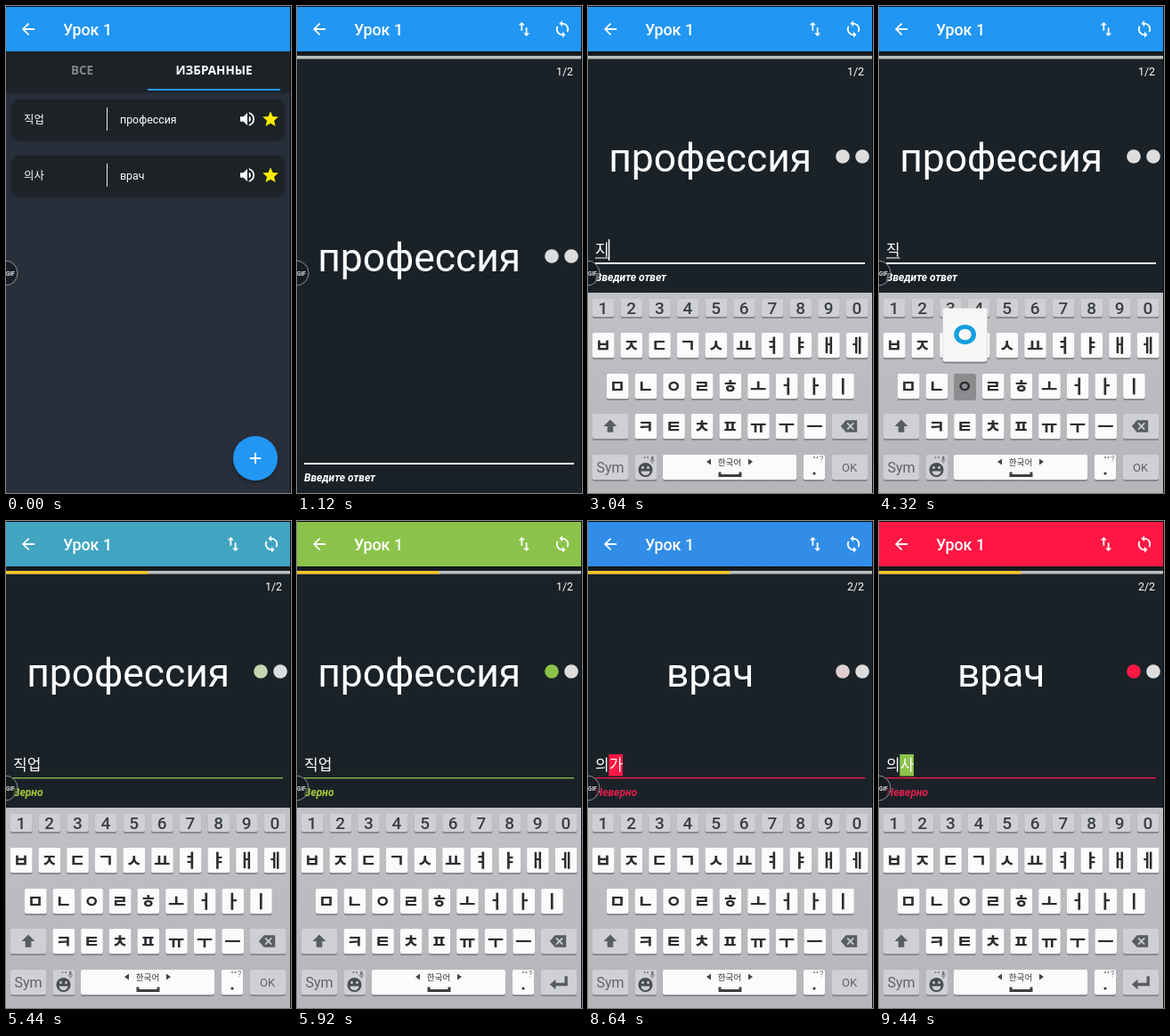
An HTML page for the animation above (9.76 s loop, 320 px wide and 547 px high).

```html
<!DOCTYPE html>
<html lang="ru">
<head>
<meta charset="utf-8">
<title>Урок 1</title>
<style>
html, body { margin: 0; width: 100%; height: 100%; overflow: hidden; background: #000; }
svg { display: block; width: 100vw; height: 100vh; }
text { font-family: Roboto, sans-serif; fill: #fff; white-space: pre; }
.ko { font-family: "Noto Sans CJK KR", "Noto Sans CJK JP", "Noto Sans CJK", sans-serif; }
.mid { text-anchor: middle; }
.end { text-anchor: end; }
.title { font-size: 17.8px; font-weight: 500; }
.tab { font: bold 13.5px "Open Sans", "Noto Sans", sans-serif; font-stretch: 75%; }
.small { font-size: 12.4px; }
.word { font-size: 44.4px; }
.hint { font-size: 12px; font-weight: 700; font-style: italic; }
.input { font-size: 17px; }
.digit { font-size: 19px; fill: #3c3f42; font-weight: 500; }
.jamo { font-size: 20px; font-weight: 700; fill: #2b2d30; }
.big { font-size: 42px; font-weight: 700; fill: #159ede; }
.fn { fill: #606366; }
</style>
</head>
<body>
<svg id="stage" viewBox="0 0 320 547" preserveAspectRatio="none"></svg>
<script>
const LOOP = 9760, TICK = 160;
const BLUE = [33, 150, 243], GREEN = [139, 195, 74], RED = [255, 23, 68], GREY = [221, 221, 221];
const PITCH = 31.65;

const ICONS = {
  back: 'M20 11H7.83l5.59-5.59L12 4l-8 8 8 8 1.41-1.41L7.83 13H20z',
  swap: 'M16 17V10h-2v7h-3l4 4 4-4zM9 3L5 7h3v7h2V7h3z',
  sync: 'M12 4V1L8 5l4 4V6a6 6 0 0 1 5.3 8.8l1.46 1.46A8 8 0 0 0 12 4zm0 14a6 6 0 0 1-5.3-8.8L5.24 7.74A8 8 0 0 0 12 20v3l4-4-4-4z',
  sound: 'M3 9v6h4l5 5V4L7 9zm13.5 3A4.5 4.5 0 0 0 14 8v8a4.5 4.5 0 0 0 2.5-4zM14 3.2v2.1a7 7 0 0 1 0 13.4v2.1a9 9 0 0 0 0-17.6z',
  star: 'M12 17.3L18.2 21l-1.65-7L22 9.24l-7.2-.6L12 2 9.2 8.64 2 9.24 7.46 14 5.8 21z',
  plus: 'M19 13h-6v6h-2v-6H5v-2h6V5h2v6h6z',
  shift: 'M12 3L3 12h5v8h8v-8h5z',
  erase: 'M23 4H8L1 12l7 8h15zm-4 11.6L17.6 17 14 13.4 10.4 17 9 15.6l3.6-3.6L9 8.4 10.4 7 14 10.6 17.6 7 19 8.4 15.4 12z',
  enter: 'M21 4v9H9V8l-8 7 8 7v-5h16V4z'
};

const rect = (x, y, w, h, fill, more = '') =>
  `<rect x="${x}" y="${y}" width="${w}" height="${h}" fill="${fill}" ${more}/>`;
const circle = (x, y, r, fill, more = '') =>
  `<circle cx="${x}" cy="${y}" r="${r}" fill="${fill}" ${more}/>`;
const text = (x, y, cls, str, more = '') =>
  `<text x="${x}" y="${y}" class="${cls}" ${more}>${str}</text>`;
const icon = (name, x, y, fill = '#fff', size = 21.3, more = '') =>
  `<path d="${ICONS[name]}" fill="${fill}" fill-rule="evenodd" ${more}
    transform="translate(${x - size / 2} ${y - size / 2}) scale(${size / 24})"/>`;

const keys = {};
function key(id, x, y, w, h, fill, face) {
  keys[id] = { x: x + w / 2, y, fill };
  return rect(x, y + 2, w, h, '#888b8f', 'rx="2"') +
    rect(x, y, w, h, fill, `rx="2" id="k${id}"`) + face;
}
const row = (chars, x0, y, h, fill, cls, base) => [...chars].map((c, i) => {
  const x = x0 + i * PITCH;
  return key(c, x - 12, y, 24.5, h, fill, text(x, y + base, cls + ' mid', c));
}).join('');

function bar(id, extra) {
  return rect(0, 1, 319, 50, '#2196f3', `id="${id}"`) + icon('back', 25, 26) +
    text(64, 32.5, 'title', 'Урок 1') + extra;
}

function card(y, ko, ru) {
  return rect(7, y, 305, 44, '#1a2227', 'rx="8" filter="url(#shade)"') +
    text(20, y + 27, 'small ko', ko) + rect(113, y + 9, 1, 26, '#e8e8e8') +
    text(128, y + 27, 'small', ru) + icon('sound', 271, y + 22) + icon('star', 297, y + 22, '#ffeb00');
}

const listView = rect(0, 1, 319, 546, '#282f3a') +
  rect(0, 51, 319, 44, '#1a2227', 'filter="url(#shade)"') + bar('listBar', '') +
  text(85.5, 77, 'tab mid', 'ВСЕ', 'style="fill:#7f8589"') +
  text(233.5, 77, 'tab mid', 'ИЗБРАННЫЕ') + rect(159, 93, 149, 2, '#2196f3') +
  card(105, '직업', 'профессия') + card(168, '의사', 'врач') +
  circle(280, 508, 25, '#2196f3', 'filter="url(#shade)"') +
  circle(280, 508, 25, '#fff', 'id="ripple" opacity="0"') + icon('plus', 280, 508);

const quizView = rect(0, 1, 319, 546, '#1a2228') +
  rect(0, 51, 319, 4, 'url(#under)') +
  bar('bar', icon('swap', 255, 26) + icon('sync', 298, 26)) +
  rect(0, 56, 319, 3.5, '#bdc0be') + rect(0, 56, 159.5, 3.5, '#f5c427', 'id="done"') +
  text(310, 78, 'small end', '', 'id="count"') +
  `<g id="middle">${text(137.2, 186, 'word mid', '', 'id="word"')}
    ${circle(286, 169, 7.8, '#ddd', 'id="dot"')}${circle(308, 169, 7.8, '#ddd')}</g>
  <g id="field">${rect(23.3, 262, 15.7, 24.5, '#f14', 'id="mark"')}
    ${text(8, 280, 'input ko', '', 'id="input"')}
    ${rect(8, 282.5, 15.6, 1, '#fff', 'id="under2"')}
    ${rect(8, 262, 1.5, 24, '#fff', 'id="caret"')}
    ${rect(8, 288, 303, 2, '#fff', 'id="line"')}
    ${text(8, 309, 'hint', '', 'id="hint"')}</g>`;

const smiley = circle(64.5, 521, 8, '#4a4d50') + circle(61.5, 518.5, 1.4, '#d0d1d4') +
  circle(67.5, 518.5, 1.4, '#d0d1d4') +
  '<path d="M59.5 522.5h10a5 4.5 0 0 1-10 0z" fill="#d0d1d4"/>' +
  circle(63.5, 507, 1, '#777') + circle(67, 507, 1, '#777') +
  rect(71, 505.5, 2.5, 5, '#777', 'rx="1.2"') +
  '<path d="M70 509.5a2.3 2.3 0 0 0 4.6 0M72.3 512v2" fill="none" stroke="#777" stroke-width=".8"/>';
const spaceFace = text(159, 516, 'ko mid', '한국어', 'style="font-size:9.6px;fill:#333"') +
  '<path d="M138 508.5v7l-5-3.5zM180 508.5v7l5-3.5z" fill="#444"/>' +
  '<path d="M148 523.5v4h23v-4" fill="none" stroke="#3c3f42" stroke-width="3"/>';
const dotFace = circle(254, 525, 1.6, '#333') + circle(254, 507, 1, '#777') +
  circle(257.5, 507, 1, '#777') + text(260, 512, '', '?', 'style="font-size:9px;fill:#777"');

const FN = '#cfd0d3', KEY = '#fbfbfc';
const board = rect(0, 322, 319, 225, 'url(#board)') +
  row('1234567890', 17, 329, 20, FN, 'digit', 17) +
  row('ㅂㅈㄷㄱㅅㅛㅕㅑㅐㅔ', 17, 367, 28, KEY, 'jamo ko', 21.5) +
  row('ㅁㄴㅇㄹㅎㅗㅓㅏㅣ', 33, 413, 28, KEY, 'jamo ko', 21.5) +
  row('ㅋㅌㅊㅍㅠㅜㅡ', 64.6, 458, 28, KEY, 'jamo ko', 21.5) +
  key('shift', 5, 458, 40, 28, FN, icon('shift', 25, 472, '#5a5d60', 20)) +
  key('erase', 274, 458, 40, 28, FN, icon('erase', 293, 472, '#5a5d60', 20)) +
  key('sym', 5, 504, 40, 28, FN, text(25, 523.5, 'fn mid', 'Sym', 'font-size="16"')) +
  key('face', 53, 504, 24, 28, FN, smiley) +
  key('space', 84, 504, 150, 28, KEY, spaceFace) +
  key('point', 242, 504, 24, 28, KEY, dotFace) +
  key('ok', 274, 504, 40, 28, FN,
    text(293.5, 522.5, 'fn mid', 'OK', 'font-size="13" id="okText"') +
    icon('enter', 293, 518, '#5a5d60', 20, 'id="okIcon"')) +
  `<g id="popup">${rect(0, 2, 50, 60, '#6d7074', 'rx="3" opacity=".7"')}
    ${rect(0, 0, 50, 60, '#f7f7f8', 'rx="3"')}${text(25, 45, 'big ko mid', '', 'id="popText"')}</g>`;

document.getElementById('stage').innerHTML = `<defs>
  <filter id="shade" x="-20%" y="-30%" width="140%" height="170%">
    <feDropShadow dx="0" dy="2" stdDeviation="2" flood-opacity=".4"/></filter>
  <linearGradient id="under" x2="0" y2="1"><stop stop-color="#0c1114"/><stop offset="1" stop-color="#1a2228"/></linearGradient>
  <linearGradient id="board" x2="0" y2="1"><stop stop-color="#bfc1c5"/><stop offset="1" stop-color="#b4b6ba"/></linearGradient>
  </defs><g>${listView}</g><g id="quiz">${quizView}</g><g id="board_">${board}</g>
  ${circle(-1, 300, 14, '#12181c', 'fill-opacity=".6" stroke="#8d9296" stroke-width="1"')}
  ${text(0, 302.5, '', 'GIF', 'style="font-size:6.5px;font-weight:500"')}
  ${rect(0, 0, 320, 1, '#0b0d0f')}${rect(319, 0, 1, 547, '#0b0d0f')}`;

const el = id => document.getElementById(id);
const set = (id, attrs) => { for (const a in attrs) el(id).setAttribute(a, attrs[a]); };
const show = (id, on) => el(id).setAttribute('visibility', on ? 'inherit' : 'hidden');

// Each step changes a few fields; key and caret reset every time.
const steps = [
  [0, { ripple: 0, enter: 0, board: 0, card: 0, text: '', tint: 0, verdict: '', done: false, ok: true }],
  [160, { ripple: .4 }], [320, { ripple: .8 }], [480, { ripple: 1 }],
  [640, { enter: .25 }], [800, { enter: .65 }], [960, { enter: .92 }], [1120, { enter: 1, ripple: 0 }],
  [1280, { board: .2 }], [1440, { board: .65 }], [1600, { board: .92 }], [1760, { board: 1 }],
  [2240, { caret: true }], [2400, { key: 'ㅈ' }], [2560, { text: 'ㅈ', caret: true }],
  [2720, { key: 'ㅣ' }], [3040, { text: '지', caret: true }],
  [3520, { key: 'ㄱ' }], [3680, { text: '직', caret: true }], [3840, {}],
  [4320, { key: 'ㅇ' }], [4480, { text: '직ㅇ', caret: true }],
  [4640, { key: 'ㅓ' }], [4800, { text: '직어', caret: true }],
  [4960, { key: 'ㅂ' }], [5120, { text: '직업', caret: true }], [5280, { key: 'ok' }],
  [5440, { verdict: 'right', tint: .3, done: true }],
  [5600, { tint: .75, ok: false }], [5760, { tint: 1 }],
  [6080, { card: 1, text: '', verdict: '', tint: .7 }], [6240, { tint: .25 }], [6400, { tint: 0 }],
  [6560, { key: 'ㅇ', ok: true }], [6720, { text: 'ㅇ', key: 'ㅡ', caret: true }],
  [6880, { text: '으', caret: true }], [7040, { key: 'ㅣ' }],
  [7200, { text: '의', caret: true }], [7360, {}],
  [7680, { key: 'ㄱ' }], [7840, { text: '의ㄱ', caret: true }],
  [8000, { key: 'ㅏ' }], [8160, { text: '의가', caret: true }], [8320, { key: 'ok' }],
  [8640, { verdict: 'wrong', tint: .07 }], [8800, { tint: .5, ok: false }],
  [8960, { tint: .85 }], [9120, { tint: 1 }], [9440, { text: '의사' }]
];
let last = {};
const states = steps.map(([at, change]) =>
  last = { ...last, key: '', caret: false, ...change, at });

const WORDS = ['профессия', 'врач'];
const HINTS = {
  '': ['Введите ответ', '#fff', '#fff'],
  right: ['Верно', '#a4cc39', '#8bc34a'],
  wrong: ['Неверно', '#e0204a', '#ff1744']
};
const mix = (a, b, p) => `rgb(${a.map((v, i) => Math.round(v + (b[i] - v) * p))})`;

function draw(s) {
  set('ripple', { opacity: s.ripple * .25 });
  set('quiz', { opacity: s.enter, transform: `translate(0 ${60 * (1 - s.enter)})` });
  set('board_', { transform: `translate(0 ${225 * (1 - s.board)})` });
  show('board_', s.board > 0);
  set('middle', { transform: `translate(0 ${s.board ? 0 : 112})` });
  set('field', { transform: `translate(0 ${s.board ? 0 : 225})` });

  const goal = s.card ? RED : GREEN;
  const tint = s.card && !s.verdict ? GREEN : goal;
  set('bar', { fill: mix(BLUE, tint, s.tint) });
  set('dot', { fill: mix(GREY, tint, s.tint) });
  show('done', s.done);
  el('count').textContent = s.card + 1 + '/2';
  el('word').textContent = WORDS[s.card];

  const [hint, hintColor, lineColor] = HINTS[s.verdict];
  el('hint').textContent = hint;
  el('hint').style.fill = hintColor;
  set('line', { fill: lineColor, height: s.verdict ? 1.3 : 2 });
  el('input').textContent = s.text;
  const end = 8 + s.text.length * 15.64;
  show('under2', s.text && !s.verdict);
  set('under2', { x: end - 15.64 });
  show('caret', s.caret);
  set('caret', { x: Math.max(8, end - .8) });
  show('mark', s.verdict === 'wrong');
  set('mark', { fill: s.text === '의사' ? '#8bc34a' : '#ff1744' });

  for (const id in keys) set('k' + id, { fill: id === s.key ? '#8b8c8e' : keys[id].fill });
  show('okText', s.ok);
  show('okIcon', !s.ok);
  const letter = s.key && s.key !== 'ok';
  show('popup', letter);
  if (letter) {
    set('popup', { transform: `translate(${keys[s.key].x - 25} ${keys[s.key].y - 73.5})` });
    el('popText').textContent = s.key;
  }
}

let shown, start = performance.now();
function frame(now) {
  const t = Math.floor((Math.max(0, now - start) % LOOP) / TICK) * TICK;
  const s = states.findLast(st => st.at <= t);
  if (s !== shown) draw(shown = s);
  requestAnimationFrame(frame);
}
frame(start);
</script>
</body>
</html>
```
